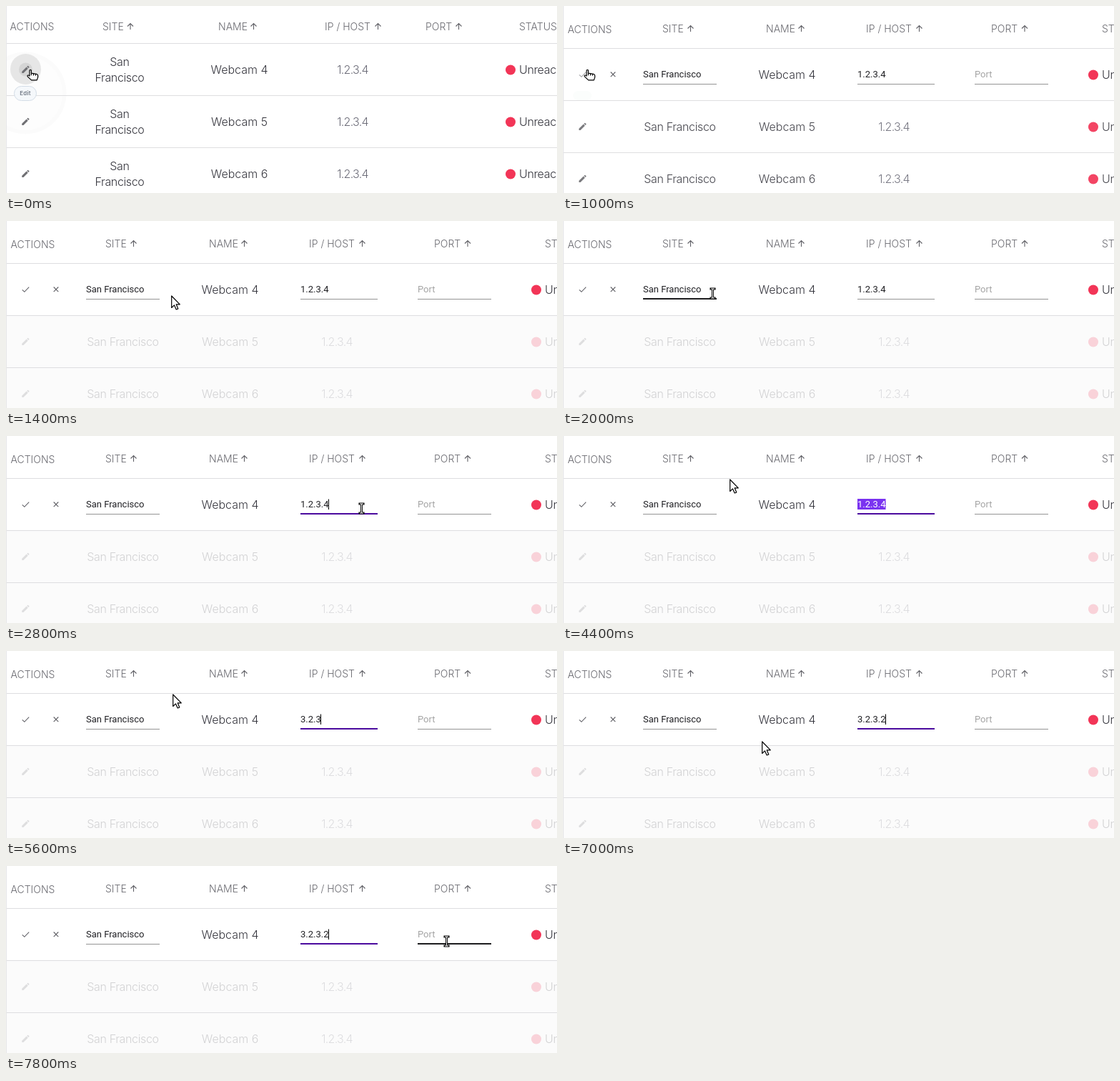
Recreate the animation shown at these times as an HTML page. Size 771 by 262 pixels, loop 8000 ms.

```html
<!DOCTYPE html>
<html lang="en">
<head>
<meta charset="utf-8">
<title>Inline table edit</title>
<style>
  html, body { margin: 0; width: 100%; height: 100%; overflow: hidden; background: #fff; }
  svg { display: block; width: 771px; height: 262px; }
  text { white-space: pre; }
  .head { font: 300 14px Inter, sans-serif; fill: #6a6a70; }
  .cell { font: 300 16px Inter, sans-serif; fill: #36363e; }
  .tight { letter-spacing: -.35px; }
  .ip { fill: #6c6c78; letter-spacing: -.7px; }
  .field { font: 400 13px Roboto, sans-serif; fill: #202024; }
  .hint { fill: #a4a4a4; }
  .tip { font: 600 8px Inter, sans-serif; fill: #727a86; letter-spacing: .15px; }
  .line { fill: none; stroke: #606066; stroke-width: 1.1; }
  .mid { text-anchor: middle; }
</style>
</head>
<body>
<svg id="stage" viewBox="0 0 771 262"></svg>
<script>
const NS = 'http://www.w3.org/2000/svg';
const LOOP = 8000;
const ROW = 73;
const stage = document.getElementById('stage');

function add(parent, tag, attrs = {}, text) {
  const el = document.createElementNS(NS, tag);
  for (const k in attrs) el.setAttribute(k, attrs[k]);
  if (text !== undefined) el.textContent = text;
  parent.appendChild(el);
  return el;
}
const group = (parent, attrs) => add(parent, 'g', attrs);
const label = (parent, x, y, cls, text) => add(parent, 'text', { x, y, class: cls }, text);
const box = (parent, x, y, width, height, fill) => add(parent, 'rect', { x, y, width, height, fill });
const disc = (parent, cx, cy, r, fill) => add(parent, 'circle', { cx, cy, r, fill });
const show = (el, on) => el.setAttribute('visibility', on ? 'visible' : 'hidden');

const PENCIL = 'M3 17.25V21h3.75L17.81 9.94l-3.75-3.75zM20.71 7.04a1 1 0 0 0 0-1.41' +
  'l-2.34-2.34a1 1 0 0 0-1.41 0l-1.83 1.83 3.75 3.75z';

function pencil(parent, y) {
  add(parent, 'path', { d: PENCIL, fill: '#707074', transform: `translate(20.6 ${y - 7}) scale(.57)` });
}

function header(parent, y, actionsX, actionsY, cols, statusX) {
  label(parent, actionsX, actionsY, 'head', 'ACTIONS');
  ['SITE', 'NAME', 'IP / HOST', 'PORT'].forEach((name, i) => {
    const [x, arrowX] = cols[i];
    label(parent, x, y, 'head', name);
    add(parent, 'path', { class: 'line', d: `M${arrowX} ${y - 1}v-8.5m-4 4l4-4l4 4` });
  });
  label(parent, statusX, y, 'head', 'STATUS');
}

function status(parent, x, y) {
  disc(parent, x, y, 7, '#f23557');
  label(parent, x + 12, y + 5.5, 'cell tight', 'Unreachable');
}

function rules(parent, y) {
  for (let i = 0; i < 3; i++) box(parent, 0, y + i * ROW, 771, 1, '#dedee0');
}

// Plain list with the edit button hovered
const list = group(stage);
disc(list, 27, 122, 57.5, '#fbfbfb');
disc(list, 27, 122, 52, '#fdfdfd');
rules(list, 52);
header(list, 34, 5.5, 34, [[135, 174], [297, 346.5], [446, 520.5], [587, 633.5]], 718);
disc(list, 27.5, 88.5, 21.5, '#e6e6e6');
disc(list, 27.5, 89, 9.5, '#d5d5d5');
for (let i = 0; i < 3; i++) {
  const y = 89.5 + i * ROW;
  pencil(list, y - 0.5);
  label(list, 159, y - 5.5, 'cell tight mid', 'San');
  label(list, 159, y + 16.5, 'cell tight mid', 'Francisco');
  label(list, 326.5, y + 5.5, 'cell mid', `Webcam ${i + 4}`);
  label(list, 485, y + 5.5, 'cell ip mid', '1.2.3.4');
  status(list, 706, y);
}
add(list, 'rect', { x: 11.5, y: 112.5, width: 31, height: 20, rx: 10, fill: '#f5f8fb', stroke: '#d3dce6' });
label(list, 27, 125.3, 'tip mid', 'Edit');

// First row in edit mode
const edit = group(stage);
const shade = box(edit, 0, 133, 771, 129, '#fbfbfb');
rules(edit, 59);
header(edit, 37, 6.5, 38, [[139, 178.5], [284, 333.5], [424, 498.5], [599, 646]], 754);
label(edit, 313.5, 102, 'cell mid', 'Webcam 4');
status(edit, 742, 96.5);
const others = group(edit);
for (let i = 1; i < 3; i++) {
  const y = 96.5 + i * ROW;
  pencil(others, y - 0.5);
  label(others, 163.5, y + 5.5, 'cell tight mid', 'San Francisco');
  label(others, 313.5, y + 5.5, 'cell mid', `Webcam ${i + 4}`);
  label(others, 463, y + 5.5, 'cell ip mid', '1.2.3.4');
  status(others, 742, y);
}
const check = add(edit, 'path', { class: 'line', d: 'M22.8 96.3l3 3l6.4-6.6' });
add(edit, 'path', { class: 'line', d: 'M66.7 92.5l6.6 6.6m0-6.6l-6.6 6.6' });
const tipGhost = add(edit, 'rect', { x: 14, y: 119, width: 26, height: 13, rx: 6.5, fill: '#fbfdfc' });

label(edit, 112, 100, 'field', 'San Francisco');
label(edit, 576, 100, 'field hint', 'Port');
const bars = {
  site: box(edit, 112, 109, 103, 1),
  ip: box(edit, 412, 109, 108, 1),
  port: box(edit, 576, 109, 103, 1)
};
const selection = box(edit, 412, 88, 39.5, 15, '#7a33f0');
const value = label(edit, 412, 100, 'field', '1.2.3.4');
const caret = box(edit, 451, 88.5, 1, 14.5, '#000');

box(stage, 0, 0, 1, 262, '#e6e6e8');

// Pointers
const ink = { fill: '#fff', stroke: '#000', 'stroke-width': 1.2, 'stroke-linejoin': 'round' };
const hand = group(stage);
add(hand, 'path', { ...ink, d: 'M4 2Q4 .8 5.2 .8Q6.4 .8 6.4 2V5.6L13.6 6.8Q15.6 7.2 15.6 9V11.4' +
  'L14.2 15.4H6.6L1.2 10.4Q.6 9.2 1.6 8.6Q2.6 8.2 4 9.6Z' });
add(hand, 'path', { d: 'M6.4 5.6v3.2M9.4 6.2v2.8M12.3 6.8v2.4', stroke: '#000', 'stroke-width': 1.1 });
const arrow = group(stage);
add(arrow, 'path', { ...ink, d: 'M.7 1V17.5L4.5 13.9L7.2 20L9.8 18.9L7.2 12.8H12.3Z' });
const beam = group(stage);
const BEAM = 'M2 2H7M4.5 2V15M2 15H7';
add(beam, 'path', { d: BEAM, stroke: '#000', 'stroke-width': 3, 'stroke-linecap': 'square' });
add(beam, 'path', { d: BEAM, stroke: '#fff', 'stroke-width': 1 });
const pointers = { hand, arrow, beam };

// Each track is a list of [start, ...state]; a state holds until the next one
const POINTER = [
  [0, 'hand', 29, 88.5], [1200, 'arrow', 231, 104], [1600, 'arrow', 243, 103],
  [1800, 'beam', 212, 94], [2000, 'beam', 205, 93], [2200, 'arrow', 242, 98],
  [2400, 'beam', 470, 93], [2600, 'beam', 486, 93], [2800, 'beam', 493, 93],
  [3200, 'beam', 492, 94], [3400, 'beam', 489, 95], [3600, 'beam', 460, 95],
  [4000, 'arrow', 253, 67], [4400, 'arrow', 233, 60], [7000, 'arrow', 278, 126],
  [7200, 'arrow', 342, 131], [7400, 'beam', 618, 89], [7800, 'beam', 612, 97]
];
const VALUE = [
  [0, '1.2.3.4'], [5000, '3.'], [5200, '3.2'], [5400, '3.2.'], [5600, '3.2.3'], [6400, '3.2.3.2']
];
const CARET = [[0, false], [2800, true], [3400, false], [5000, true], [7200, false], [7800, true]];
const BARS = {
  site: [[0, 'idle'], [1200, 'fade'], [1400, 'idle'], [2000, 'hover'], [2200, 'fade'], [2400, 'idle']],
  ip: [[0, 'idle'], [2400, 'fade'], [2600, 'hover'], [2800, 'focus']],
  port: [[0, 'idle'], [7400, 'fade'], [7800, 'hover']]
};
const BAR_STYLE = {
  idle: ['#949494', 1], fade: ['#4c4c4c', 1], hover: ['#1c1c1e', 2], focus: ['#4a0a9e', 2]
};
const at = (track, t) => track.filter(s => s[0] <= t).pop().slice(1);

function draw(t) {
  const editing = t >= 1000;
  const dim = t >= 1200;
  list.setAttribute('display', editing ? 'none' : 'inline');
  edit.setAttribute('display', editing ? 'inline' : 'none');
  shade.setAttribute('opacity', dim ? 1 : 0);
  others.setAttribute('opacity', dim ? 0.2 : 0.92);
  check.setAttribute('opacity', dim ? 1 : 0.6);
  show(tipGhost, !dim);

  for (const name in BARS) {
    const [fill, h] = BAR_STYLE[at(BARS[name], t)[0]];
    bars[name].setAttribute('fill', fill);
    bars[name].setAttribute('y', 110 - h);
    bars[name].setAttribute('height', h);
  }

  const selected = t >= 4000 && t < 5000;
  show(selection, selected);
  value.style.fill = selected ? '#fff' : '';
  const text = at(VALUE, t)[0];
  if (value.textContent !== text) value.textContent = text;
  show(caret, at(CARET, t)[0]);
  if (editing) caret.setAttribute('x', Math.floor(412 + value.getComputedTextLength()));

  const [kind, x, y] = at(POINTER, t);
  for (const name in pointers) show(pointers[name], name === kind);
  pointers[kind].setAttribute('transform', `translate(${x} ${y})`);
}

const start = performance.now();
function tick() {
  draw((performance.now() - start) % LOOP);
  requestAnimationFrame(tick);
}
tick();
</script>
</body>
</html>
```
